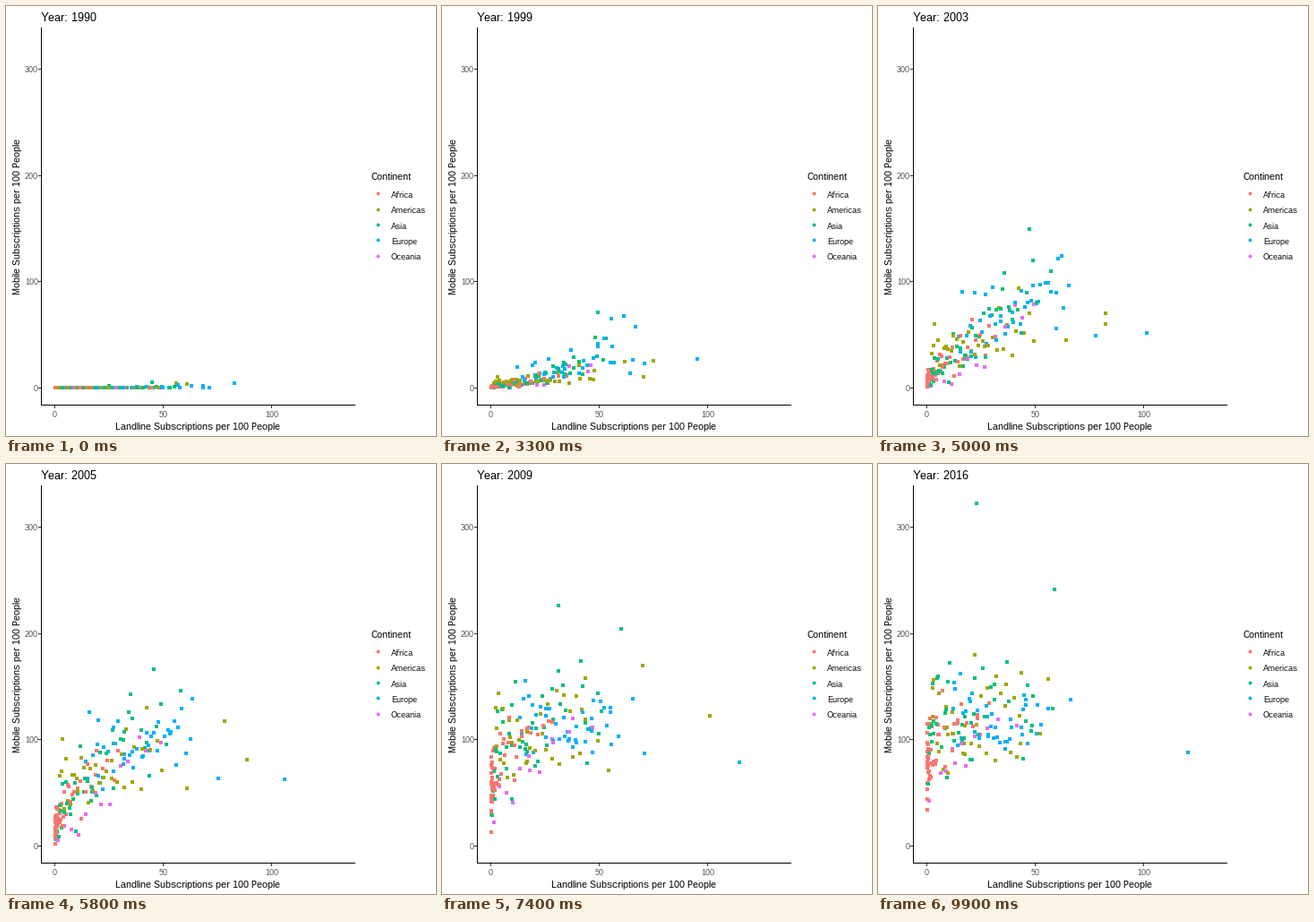
Recreate the animation shown at these times as a matplotlib script. Size 480 by 480 pixels, loop 10 s.

```python
from collections import namedtuple

import matplotlib.pyplot as plt
import numpy as np
from matplotlib.animation import FuncAnimation

SIZE, DPI, FRAMES = 480, 100, 100
PX = 72 / DPI
START, PEAK, END = 1990, 2003, 2016
YEARS = np.arange(START, END + 1)

COLORS = {
    "Africa": "#F8766D",
    "Americas": "#A3A500",
    "Asia": "#00BF7D",
    "Europe": "#00B0F6",
    "Oceania": "#E76BF3",
}

# Pairs run from the poorest country to the richest
Region = namedtuple("Region", "count land skew loss uptake cap spread")
REGIONS = {
    "Africa": Region(52, (0.2, 31), 4.5, 0.05, (2009, 2004), (60, 135), 24),
    "Americas": Region(35, (2, 50), 1.5, 0.05, (2005, 2003.5), (118, 113), 25),
    "Asia": Region(45, (0.5, 52), 1.7, 0.0, (2009.5, 2000.5), (115, 125), 28),
    "Europe": Region(42, (14, 66), 1.1, 0.17, (2004, 2000), (128, 114), 17),
    "Oceania": Region(13, (0.5, 52), 1.2, 0.3, (2009.5, 2001), (65, 108), 12),
}

# Countries far from the cloud: a few landline stops, then the uptake curve
Leader = namedtuple("Leader", "region land middle width cap")
LEADER_STOPS = (1990, 2003, 2012, 2016)
LEADERS = [
    Leader("Europe", (83, 101.5, 120.5, 120.5), 2002, 4, 91),
    Leader("Europe", (57, 78, 68, 44), 2004, 4, 110),
    Leader("Americas", (61, 82, 109, 56), 2005.5, 4, 168),
    Leader("Americas", (45, 83, 65, 22), 2004, 1.9, 180),
    Leader("Americas", (56, 64.5, 50.5, 41.5), 2003, 4.5, 88),
    Leader("Asia", (25, 38, 28.5, 23), 2007.3, 3.3, 345),
    Leader("Asia", (45, 57, 61.5, 59), 2004, 3.6, 250),
]

rng = np.random.default_rng(5)


def noise(*shape):
    return np.clip(rng.normal(size=shape), -1.9, 1.9)


def lerp(a, b, u):
    return a + (b - a) * u


def uptake(middle, width, cap):
    return cap / (1 + np.exp((middle - YEARS) / width))


def cloud(r):
    """Yearly landline and mobile values of a region, ranked by wealth."""
    n = r.count
    u = ((np.arange(n) + 0.5) / n)[:, None]
    early = np.clip((PEAK - YEARS) / (PEAK - START), 0, 1)
    late = np.clip((YEARS - PEAK) / (END - PEAK), 0, 1)
    share = 1 - 0.75 * (1 - u) * early - r.loss * late
    drift = 1 + 0.15 * noise(n, 1) * (late - early)
    land = lerp(*r.land, u ** r.skew) * share * drift
    cap = np.maximum(lerp(*r.cap, u) + r.spread * noise(n, 1), 22)
    mobile = uptake(lerp(*r.uptake, u) + 0.9 * noise(n, 1), 2.0, cap)
    jitter = 1 + 0.015 * noise(2, n, len(YEARS))
    return land * jitter[0], mobile * jitter[1]


def build():
    land, mobile, colors = [], [], []
    for name, region in REGIONS.items():
        xs, ys = cloud(region)
        land.extend(xs)
        mobile.extend(ys)
        colors += [COLORS[name]] * region.count
    for p in LEADERS:
        land.append(np.interp(YEARS, LEADER_STOPS, p.land))
        mobile.append(uptake(p.middle, p.width, p.cap))
        colors.append(COLORS[p.region])
    order = rng.permutation(len(colors))
    return np.array(land)[order], np.array(mobile)[order], np.array(colors)[order]


def to_x(v):
    return 54.9 + 2.412 * v


def to_y(v):
    return 426.4 - 1.1868 * v


plt.rcParams.update({
    "font.family": "Liberation Sans",
    "text.hinting": "native",
    "text.hinting_factor": 1,
})
fig = plt.figure(figsize=(SIZE / DPI, SIZE / DPI), dpi=DPI, facecolor="white")
ax = fig.add_axes([0, 0, 1, 1])
ax.set(xlim=(0, SIZE), ylim=(SIZE, 0))
ax.axis("off")


def label(x, y, text, size, color="black", **kw):
    return ax.text(x, y, text, fontsize=size * PX, color=color, va="baseline", **kw)


def line(xs, ys, color="black"):
    ax.plot(xs, ys, color=color, lw=PX, solid_capstyle="butt", snap=False)


def dots(xs, ys, c):
    return ax.scatter(np.round(xs), np.round(ys), s=(3.9 * PX) ** 2, c=c,
                      linewidths=0, antialiased=False, zorder=3)


line([39.5, 39.5], [24, 446])
line([39, 390], [445.5, 445.5])
for v in (0, 50, 100):
    x = np.floor(to_x(v)) + 0.5
    line([x, x], [446, 449], "#333333")
    label(x, 459, str(v), 9, "#4D4D4D", ha="center")
for v in (0, 100, 200, 300):
    y = np.floor(to_y(v)) + 0.5
    line([36, 39], [y, y], "#333333")
    label(36, y + 3.5, str(v), 9, "#4D4D4D", ha="right")

label(214, 473, "Landline Subscriptions per 100 People", 11, ha="center")
label(16, 234.5, "Mobile Subscriptions per 100 People", 11, ha="center",
      rotation=90, rotation_mode="anchor")
title = label(39, 17, "", 13)

label(407, 194, "Continent", 11)
for i, (name, color) in enumerate(COLORS.items()):
    y = 209.4 + 17.28 * i
    dots([415], [y], [color])
    label(430, y + 4.6, name, 9)

land, mobile, colors = build()
points = dots(to_x(land[:, 0]), to_y(mobile[:, 0]), colors)


def update(frame):
    t = frame * (END - START) / (FRAMES - 1)
    i = min(int(t), END - START - 1)
    xs = lerp(land[:, i], land[:, i + 1], t - i)
    ys = lerp(mobile[:, i], mobile[:, i + 1], t - i)
    points.set_offsets(np.round(np.column_stack([to_x(xs), to_y(ys)])))
    title.set_text(f"Year: {round(START + t)}")
    return points, title


anim = FuncAnimation(fig, update, frames=FRAMES, interval=100,
                     repeat=True, repeat_delay=0, blit=False)
plt.show()
```
